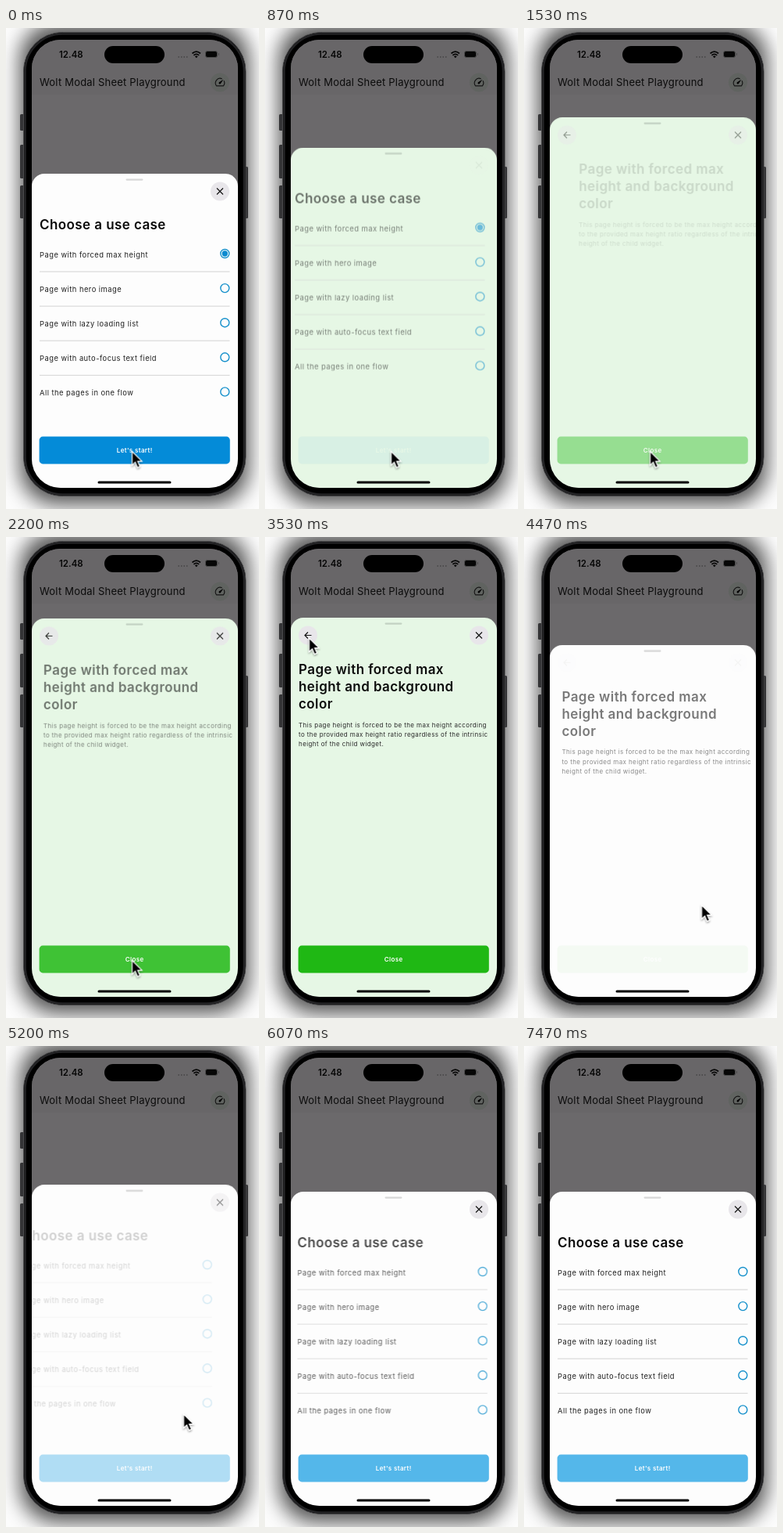
Animation of 324 by 614 pixels, one loop 7.74 s. Source, as an HTML page:

```html
<!DOCTYPE html>
<html lang="en">
<head>
<meta charset="utf-8">
<title>Modal sheet</title>
<style>
  html, body { margin: 0; width: 100%; height: 100%; overflow: hidden; background: #fcfcfc; }
  svg { display: block; width: 324px; height: 614px; font-family: Inter, sans-serif; }
  .title { font-size: 17px; font-weight: 600; letter-spacing: .42px; fill: #0b0b0b; }
  .row { font-size: 9.4px; letter-spacing: .46px; fill: #222; }
  .body { font-size: 8px; letter-spacing: .4px; fill: #2a2a2a; }
  .cta { font-size: 8px; font-weight: 600; letter-spacing: .35px; fill: #fff; text-anchor: middle; }
  .icon { fill: none; stroke: #161616; stroke-width: 1.2; }
  .ring { fill: none; stroke: #1590cb; stroke-width: 1.4; }
</style>
</head>
<body>
<svg viewBox="0 0 324 614">
  <defs>
    <clipPath id="screen"><rect x="33" y="15" width="264" height="572" rx="37"/></clipPath>
    <filter id="blur" x="-30%" y="-20%" width="160%" height="140%"><feGaussianBlur stdDeviation="13"/></filter>
    <filter id="soft" x="-50%" y="-50%" width="200%" height="200%"><feDropShadow dx="0" dy="1.5" stdDeviation="1.2" flood-opacity=".4"/></filter>
  </defs>

  <rect width="324" height="614" fill="#fcfcfc"/>
  <rect x="18" y="-6" width="293" height="614" rx="46" fill="#000" opacity=".68" filter="url(#blur)"/>

  <g fill="#343436">
    <rect x="18" y="110" width="6" height="21" rx="1.5"/>
    <rect x="18" y="149" width="6" height="43" rx="1.5"/>
    <rect x="18" y="201" width="6" height="42" rx="1.5"/>
    <rect x="305" y="177" width="5" height="66" rx="1.5"/>
  </g>
  <rect x="22.5" y="5.5" width="284.5" height="592" rx="50" fill="#000" stroke="#4b4b4d"/>
  <rect x="24.5" y="7.5" width="280.5" height="588" rx="48" fill="none" stroke="#242426" stroke-width="2.5"/>

  <g clip-path="url(#screen)">
    <rect x="33" y="15" width="264" height="572" fill="#6b696b"/>
    <rect x="33" y="15" width="264" height="70" fill="#686668"/>
    <text x="68" y="38" font-size="11.5" font-weight="600" fill="#060606">12.48</text>
    <rect x="126" y="23" width="77" height="22" rx="11"/>
    <path d="M220.5 37H233" stroke="#444" stroke-width="1.5" stroke-dasharray="1.5 2"/>
    <path d="M238.5 32.5Q243.8 27.8 249 32.5M240.4 34.8Q243.8 31.8 247.2 34.8" fill="none" stroke="#060606" stroke-width="1.7"/>
    <path d="M241.9 36.2Q243.8 34.8 245.7 36.2L243.8 38.2Z"/>
    <rect x="255.5" y="29.5" width="15" height="8" rx="2.5" fill="#060606" stroke="#4a4a4a"/>
    <path d="M272.3 32v3" stroke="#4a4a4a"/>
    <text x="43" y="74" font-size="13" letter-spacing=".2" fill="#0b0b0b">Wolt Modal Sheet Playground</text>
    <circle cx="274" cy="69.5" r="12" fill="#606360"/>
    <path class="icon" d="M276.6 64.9A5.8 5.8 0 0 0 269.6 73.8H278.4A5.8 5.8 0 0 0 279 67.2"/>
    <path d="M278.4 65.8L274.9 71.1A1.3 1.3 0 0 1 272.9 69.2Z"/>

    <g id="sheet">
      <rect id="paper" x="33" width="264" height="600" rx="16"/>
      <rect x="153.5" y="6.5" width="22" height="2.2" rx="1.1" fill="#000" opacity=".15"/>
      <g id="list"><text class="title" x="43" y="71">Choose a use case</text></g>
      <g id="page"></g>
      <g id="listBar"></g>
      <g id="pageBar"></g>
    </g>

    <g id="listCta">
      <rect id="start" x="42.6" y="521.6" width="244.2" height="34.8" rx="4.5"/>
      <text class="cta" x="164.7" y="542">Let's start!</text>
    </g>
    <g id="pageCta">
      <rect x="42.6" y="521.6" width="244.2" height="34.8" rx="4.5" fill="#1fb814"/>
      <text class="cta" x="164.7" y="542">Close</text>
    </g>
    <rect x="117.5" y="578.5" width="94" height="3" rx="1.5"/>
  </g>

  <g id="cursor" filter="url(#soft)">
    <path d="M0 0V17.6L4 13.8L6.9 20.6L10 19.3L7.2 12.7H12.6Z" stroke="#fff" stroke-width="1.2"/>
  </g>
</svg>

<script>
const LOOP = 7740;
const OPEN = 120, BACK = 3705;      // start of each page change
const SLOW = 8;                     // time dilation of the 350 ms transition
const EASE = 'cubic-bezier(.4,0,.2,1)';
const MOVE = 'cubic-bezier(.5,0,.15,1)';
const $ = id => document.getElementById(id);

const add = (id, markup) => $(id).insertAdjacentHTML('beforeend', markup);
const text = (cls, x, y, str) => `<text class="${cls}" x="${x}" y="${y}">${str}</text>`;
const disc = x => `<circle cx="${x}" cy="22.5" r="12" fill="#e8e6ea"/>`;
const cross = disc(274) + '<path class="icon" d="M270 18.500l8 8m0-8l-8 8"/>';
const arrow = disc(55) + '<path class="icon" d="M59.500 22.500H51m4-4l-4 4l4 4"/>';

['Page with forced max height', 'Page with hero image', 'Page with lazy loading list',
 'Page with auto-focus text field', 'All the pages in one flow'].forEach((label, i) => {
  const y = 102 + i * 44.1;
  add('list', text('row', 43, y + 4.6, label) + `<circle class="ring" cx="280.3" cy="${y}" r="5.5"/>`);
  if (i < 4) add('list', `<path d="M43 ${y + 23}H286.5" stroke="#d2d2d2"/>`);
});
add('list', '<circle id="dot" cx="280.3" cy="102" r="3.7" fill="#0b8bd0"/>');

['Page with forced max', 'height and background', 'color'].forEach((line, i) =>
  add('page', text('title', 43, 72 + i * 22, line)));
['This page height is forced to be the max height according',
 'to the provided max height ratio regardless of the intrinsic',
 'height of the child widget.'].forEach((line, i) =>
  add('page', text('body', 43, 139.5 + i * 12.3, line)));

add('listBar', cross);
add('pageBar', arrow + cross);

// Each step is [ms, value, easing towards the next step].
function track(id, prop, ...steps) {
  const all = [[0, steps[0][1]], ...steps, [LOOP, steps.at(-1)[1]]];
  $(id).animate(
    all.map(([ms, value, easing = 'linear']) => ({ offset: ms / LOOP, [prop]: value, easing })),
    { duration: LOOP, iterations: Infinity });
}

// Goes from a to b after OPEN and back to a after BACK, within the given spans of the transition.
function swap(id, prop, a, b, there, back = there, easing) {
  const at = (start, k) => start + k * SLOW;
  track(id, prop,
    [at(OPEN, there[0]), a, easing], [at(OPEN, there[1]), b],
    [at(BACK, back[0]), b, easing], [at(BACK, back[1]), a]);
}

const cut = (id, prop, ...steps) =>
  track(id, prop, ...steps.map(([ms, value]) => [ms, value, 'step-end']));

const at = (x, y) => `translate(${x}px,${y}px)`;

swap('sheet', 'transform', at(0, 186), at(0, 103), [0, 300], [0, 300], EASE);
swap('list', 'transform', at(0, 0), at(-79, 0), [50, 350], [50, 350], EASE);
swap('page', 'transform', at(79, 0), at(0, 0), [50, 350], [50, 350], EASE);
swap('list', 'opacity', 1, 0, [50, 150], [150, 350]);
swap('page', 'opacity', 0, 1, [150, 350], [50, 150]);
for (const part of ['Bar', 'Cta']) {
  swap('list' + part, 'opacity', 1, 0, [0, 100], [100, 290]);
  swap('page' + part, 'opacity', 0, 1, [100, 290], [0, 100]);
}

cut('paper', 'fill', [0, '#fdfdfd'], [OPEN, '#e6f7e5'], [BACK, '#fdfdfd']);
cut('start', 'fill', [0, '#048bd8'], [3000, '#54b7ea']);
cut('dot', 'opacity', [0, 1], [3000, 0]);

track('cursor', 'transform',
  [2400, at(161.5, 540.5), MOVE], [3530, at(56.5, 129)],
  [3700, at(56.5, 129), 'ease-in-out'], [4420, at(227.5, 470)],
  [5480, at(227.5, 470), 'ease-in'], [5680, at(232, 566)]);
cut('cursor', 'opacity', [0, 1], [5680, 0]);
</script>
</body>
</html>
```
